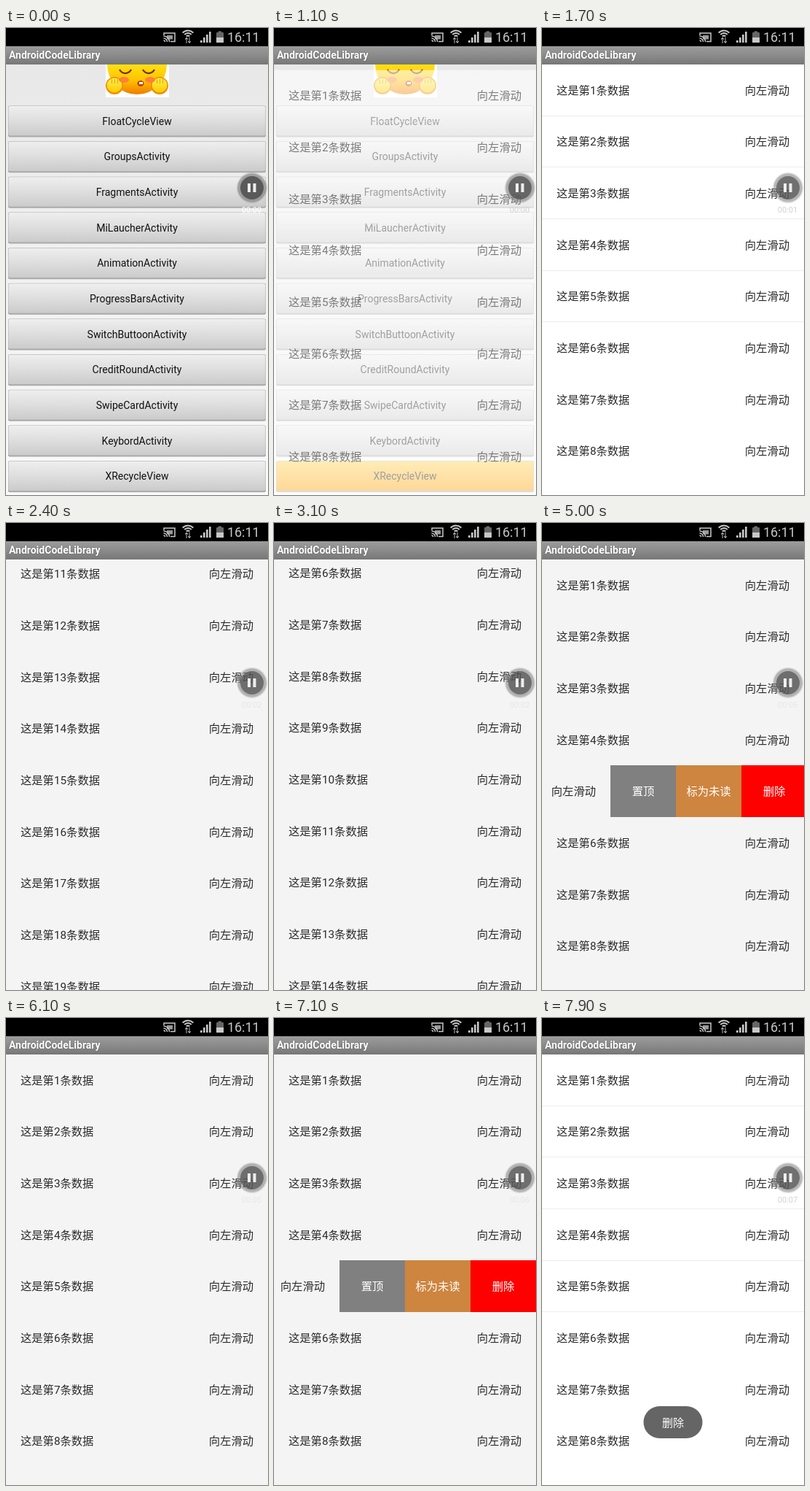
Write an HTML page with a canvas that moves like this. It is 360 px wide and 640 px high and loops after 8000 ms.

```html
<!DOCTYPE html>
<html lang="zh-CN">
<head>
<meta charset="utf-8">
<style>
html, body { margin: 0; width: 100%; height: 100%; overflow: hidden; background: #fff; }
canvas { display: block; }
</style>
</head>
<body>
<canvas id="stage" width="360" height="640"></canvas>
<script>
const ctx = document.getElementById('stage').getContext('2d');
const LOOP = 8000, STEP = 100, PITCH = 212 / 3, TOP = 50, BASELINE = 40.75, SWIPED = 5;
const FONT = 'Roboto, "Noto Sans CJK SC", "Noto Sans CJK", sans-serif';
const BUTTONS = ['FloatCycleView', 'GroupsActivity', 'FragmentsActivity', 'MiLaucherActivity',
  'AnimationActivity', 'ProgressBarsActivity', 'SwitchButtoonActivity', 'CreditRoundActivity',
  'SwipeCardActivity', 'KeybordActivity', 'XRecycleView'];
const ACTIONS = [['置顶', '#808080'], ['标为未读', '#cd853f'], ['删除', '#f00']];
// Time and leftward offset of the swiped row
const SWIPE = [[3400, 0], [3500, 3], [3750, 3], [4450, 270], [4950, 270], [5000, 266],
  [5350, 266], [5950, 0], [6250, 0], [6900, 270], [7200, 270], [7500, 0]];

const clamp = v => Math.max(0, Math.min(1, v));
const ramp = (t, a, b) => clamp((t - a) / (b - a));
const smooth = u => u * u * (3 - 2 * u);

function rect(x, y, w, h, color) {
  ctx.fillStyle = color;
  ctx.fillRect(x, y, w, h);
}
function round(x, y, w, h, r, color) {
  ctx.fillStyle = color;
  ctx.beginPath();
  ctx.roundRect(x, y, w, h, r);
  ctx.fill();
}
function oval(x, y, rx, ry, color) {
  ctx.fillStyle = color;
  ctx.beginPath();
  ctx.ellipse(x, y, rx, ry, 0, 0, 7);
  ctx.fill();
}
function arc(x, y, r, from, to, color, width) {
  ctx.strokeStyle = color;
  ctx.lineWidth = width;
  ctx.beginPath();
  ctx.arc(x, y, r, from * Math.PI, to * Math.PI);
  ctx.stroke();
}
function text(str, x, y, size, color, align = 'left', weight = 400) {
  ctx.font = `${weight} ${size}px ${FONT}`;
  ctx.textAlign = align;
  ctx.fillStyle = color;
  ctx.fillText(str, x, y);
}
function gradient(y0, y1, ...colors) {
  const g = ctx.createLinearGradient(0, y0, 0, y1);
  colors.forEach((c, i) => g.addColorStop(i / (colors.length - 1), c));
  return g;
}

function smiley() {
  rect(137, 50, 87, 45, '#fff');
  oval(180, 50, 41, 41, gradient(50, 91, '#ffe014', '#ffc400', '#f07c00'));
  for (const side of [-1, 1]) {
    const x = 180 + side * 31;
    oval(x, 79, 12, 12, '#ee8c00');
    oval(x, 78.5, 10.5, 10, gradient(69, 89, '#fff04a', '#ffc800'));
    for (const k of [-4, 0, 4]) rect(x + k, 70, 1, 6, '#e29a10');
    oval(180 + side * 18, 71, 7, 4, '#ff8038');
    arc(180 + side * 16, 53, 9, 0.15, 0.85, '#70320a', 2.2);
  }
  oval(185, 76, 4.5, 4, '#b5401c');
  rect(183, 74, 5, 3, '#fff');
}

function menu(t) {
  rect(0, TOP, 360, 590, gradient(TOP, 640, '#e8e8e8', '#fafafa'));
  smiley();
  BUTTONS.forEach((label, i) => {
    const y = 106.5 + i * 146 / 3;
    const pressed = i === 10 && t >= 500;
    round(3, y, 354, 43, 2, '#a9a9a9');
    round(3.5, y + 0.5, 353, 40.5, 2,
      pressed ? gradient(y, y + 41, '#ffd24a', '#ff9c00') : gradient(y, y + 41, '#efefef', '#dedede', '#cbcbcb'));
    text(label, 180, y + 26, 14, '#111', 'center');
  });
}

function scrollAt(t) {
  const u = ramp(t, 1700, 2500), v = ramp(t, 2500, 3352);
  return 733.5 * (1 - (1 - u) ** 2) * (1 - v * v);
}

function swipeAt(t) {
  const i = SWIPE.findIndex(k => k[0] > t);
  if (i < 1) return 0;
  const [t0, a] = SWIPE[i - 1], [t1, b] = SWIPE[i];
  return a + (b - a) * smooth(ramp(t, t0, t1));
}

function list(t, white) {
  rect(0, TOP, 360, 660, white ? '#fff' : '#f4f4f4');
  const scroll = scrollAt(t);
  for (let n = 1; n <= 30; n++) {
    const y = TOP + (n - 1) * PITCH - scroll;
    if (y < TOP - PITCH || y > 640) continue;
    const dx = n === SWIPED ? swipeAt(t) : 0;
    text(`这是第${n}条数据`, 20 - dx, y + BASELINE, 15.3, '#2b2b2b');
    text('向左滑动', 340 - dx, y + BASELINE, 15.3, '#2b2b2b', 'right');
    if (dx) ACTIONS.forEach(([label, color], i) => {
      const x = Math.round(360 - dx) + i * 90;
      rect(x, Math.floor(y), 90, 71, color);
      text(label, x + 45, y + BASELINE, 15.3, '#fff', 'center');
    });
    if (white && n <= 5) rect(0, Math.round(y + PITCH) - 1, 360, 1, '#ededed');
  }
}

function statusBar() {
  const ink = '#c8c8c8';
  rect(0, 0, 360, 25, '#000');
  ctx.strokeStyle = ink;
  ctx.lineWidth = 1.5;
  ctx.beginPath();
  ctx.moveTo(217, 10);
  ctx.lineTo(217, 7);
  ctx.lineTo(232, 7);
  ctx.lineTo(232, 18.5);
  ctx.lineTo(226, 18.5);
  ctx.stroke();
  rect(221, 10, 8, 5.5, '#999');
  for (const r of [2, 5, 8]) arc(216.5, 19, r, 1.5, 2, ink, 1.4);
  for (const r of [3, 6.5, 10]) arc(250, 13.5, r, 1.24, 1.76, ink, 2);
  text('⇅', 250, 20, 9, ink, 'center', 700);
  for (let i = 0; i < 4; i++) rect(267 + i * 4, 17 - i * 4, 2.6, 3 + i * 4, ink);
  rect(291.5, 4.5, 4.5, 2, '#777');
  round(289, 6, 10, 14, 1, '#666');
  rect(289, 13, 10, 7, ink);
  text('16:11', 348.7, 19, 18, ink, 'right');
}

function titleBar() {
  rect(0, 25, 360, 25, gradient(25, 50, '#9c9c9c', '#8b8b8b', '#777'));
  ctx.shadowColor = 'rgba(0,0,0,.45)';
  ctx.shadowBlur = 1.5;
  text('AndroidCodeLibrary', 4, 42, 14, '#fff', 'left', 700);
  ctx.shadowBlur = 0;
}

function recorder(t, color, opacity) {
  ctx.globalAlpha = opacity;
  oval(338, 219, 21, 21, 'rgba(110,110,110,.28)');
  oval(338, 219, 19.5, 19.5, 'rgba(130,130,130,.55)');
  oval(338, 219, 16, 16, 'rgba(75,75,75,.82)');
  ctx.globalAlpha = 1;
  rect(332, 213, 4, 12, '#eee');
  rect(339.5, 213, 4, 12, '#eee');
  const sec = Math.max(t < 5000 ? 0 : 5, Math.floor((t - 150) / 1000));
  text(`00:0${Math.max(0, sec)}`, 337.5, 253, 11, color, 'center');
}

function toast(t) {
  ctx.globalAlpha = ramp(t, 7200, 7500);
  round(139.5, 532, 81, 44, 22, '#656565');
  text('删除', 180, 559.5, 15, '#fff', 'center');
  ctx.globalAlpha = 1;
}

function draw(t) {
  const white = t < 1800 || t >= 7200;
  const opened = ramp(t, 800, 1300);
  if (opened < 1) menu(t);
  if (opened > 0) {
    ctx.save();
    ctx.globalAlpha = opened;
    ctx.translate(0, 48 * (1 - opened) ** 2);
    list(t, white);
    ctx.restore();
  }
  statusBar();
  titleBar();
  if (t >= 7200) toast(t);
  recorder(t, opened < 0.5 ? '#fff' : white ? '#d2d2d2' : '#e6e6e6', 1 - 0.2 * opened);
}

function tick(now) {
  draw(Math.floor((now % LOOP) / STEP) * STEP);
  requestAnimationFrame(tick);
}
requestAnimationFrame(tick);
</script>
</body>
</html>
```
